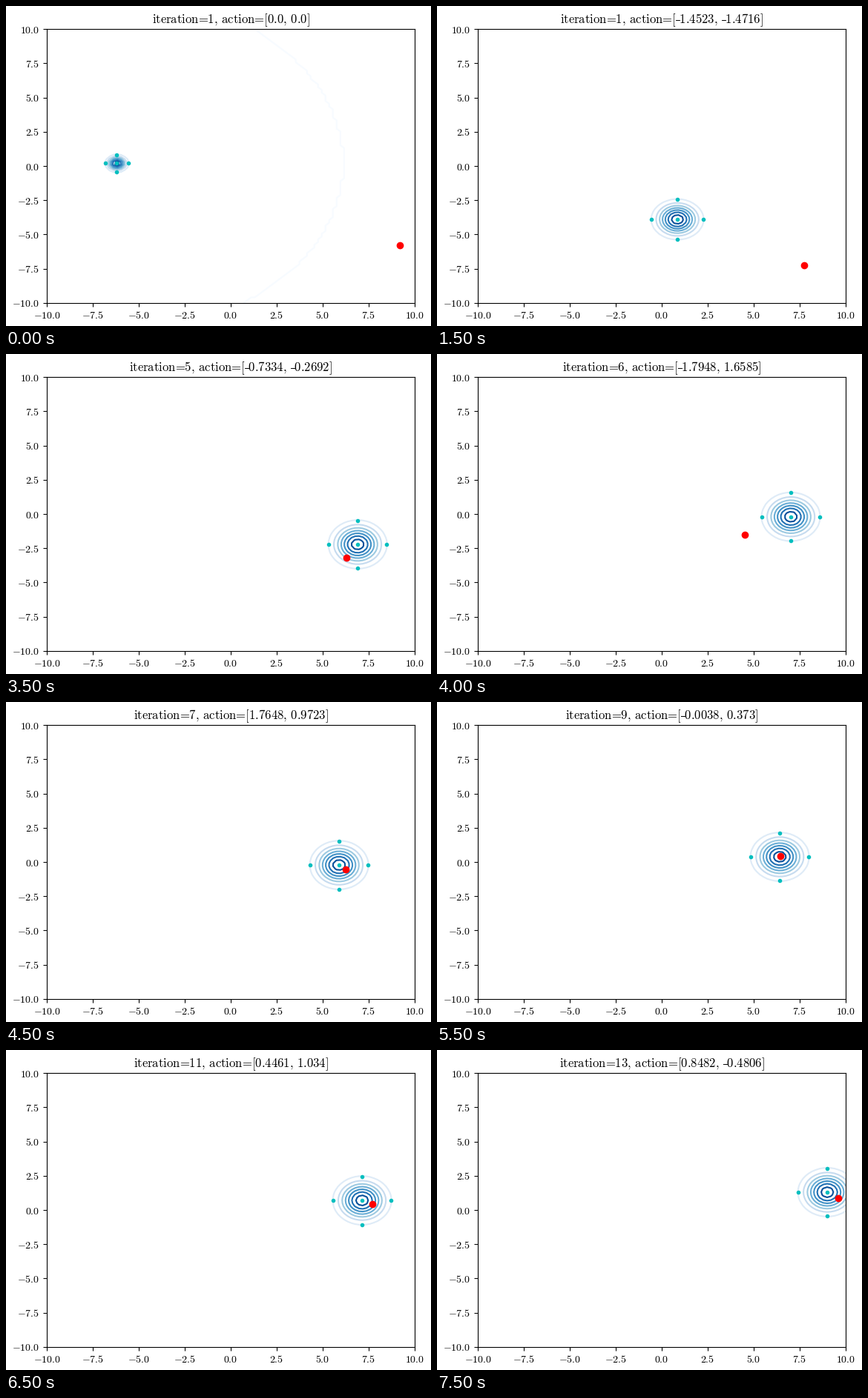
A matplotlib script for the animation above (8000 ms loop, 573x432 px).

```python
import numpy as np
import matplotlib.pyplot as plt
from matplotlib.animation import FuncAnimation

plt.rcParams["mathtext.fontset"] = "cm"

W, H, DPI = 573, 432, 100
HOLD = 2  # extra ticks spent on the starting state

# Action applied at each step (the first entry is the resting start)
ACTIONS = np.array([
    (0.0, 0.0), (-1.4523, -1.4716), (-0.4837, 0.8166), (-0.2841, 2.7747),
    (0.0534, 0.7492), (-0.7334, -0.2692), (-1.7948, 1.6585),
    (1.7648, 0.9723), (0.2038, 0.5973), (-0.0038, 0.373),
    (0.7839, -1.0343), (0.4461, 1.034), (1.0518, 0.9406), (0.8482, -0.4806),
])
TARGET = np.array([9.2, -5.77]) + np.cumsum(ACTIONS, axis=0)

# Estimated position after each step
MEAN = [
    (-6.19, 0.19), (0.85, -3.9), (4.15, -4.5), (5.61, -2.03), (6.54, -2.0),
    (6.9, -2.22), (7.02, -0.2), (5.89, -0.22), (6.3, -0.12), (6.42, 0.38),
    (7.51, -1.18), (7.14, 0.7), (8.08, 1.45), (9.0, 1.3),
]
# Standard deviations settle to a steady value
SIGMA = [(0.316, 0.316), (0.70, 0.73), (0.767, 0.82), (0.78, 0.867)]
STEADY = (0.786, 0.878)

axis = np.linspace(-10, 10, 100)
X, Y = np.meshgrid(axis, axis)

fig = plt.figure(figsize=(W / DPI, H / DPI), dpi=DPI)
ax = fig.add_axes([55 / W, 31.2 / H, 496 / W, 369.6 / H])
ax.set(xlim=(-10, 10), ylim=(-10, 10))
ticks = np.arange(-10, 10.1, 2.5)
labels = [f"${t:.1f}$" for t in ticks]
ax.set_xticks(ticks, labels)
ax.set_yticks(ticks, labels)

sigma_dots, = ax.plot([], [], "c.", zorder=3)
target_dot, = ax.plot([], [], "ro", zorder=4)
rings = None


def roman(text):
    """Upright text with text-mode spacing and short hyphens."""
    for old, new in (
        ("-", r"\overline{\hspace{0.31}}~"),
        ("=", r"\hspace{-0.2}=\hspace{-0.2}"),
        (", ", r"{,}\hspace{0.38}"),
        ("~", r"\hspace{0.07}"),
    ):
        text = text.replace(old, new) if old != "=" else new.join(text.split("="))
    return rf"$\mathrm{{{text}}}$"


def density(mean, sigma):
    (mx, my), (sx, sy) = mean, sigma
    log_p = -0.5 * (((X - mx) / sx) ** 2 + ((Y - my) / sy) ** 2)
    return np.exp(log_p - np.log(2 * np.pi * sx * sy))


def update(i):
    global rings
    step = max(0, i - HOLD)
    mean = MEAN[step]
    sigma = SIGMA[step] if step < len(SIGMA) else STEADY
    (mx, my), (sx, sy) = mean, sigma

    if rings is not None:
        rings.remove()
    rings = ax.contour(X, Y, density(mean, sigma), cmap="Blues")

    sigma_dots.set_data([mx, mx + 2 * sx, mx, mx - 2 * sx, mx],
                        [my, my, my + 2 * sy, my, my - 2 * sy])
    target_dot.set_data(TARGET[step, :1], TARGET[step, 1:])
    ux, uy = ACTIONS[step].tolist()
    ax.set_title(roman(f"iteration={max(1, step)}, action=[{ux}, {uy}]"))
    return sigma_dots, target_dot


anim = FuncAnimation(fig, update, frames=len(ACTIONS) + HOLD, interval=500,
                     init_func=lambda: (), repeat=True, repeat_delay=0)
plt.show()
```
